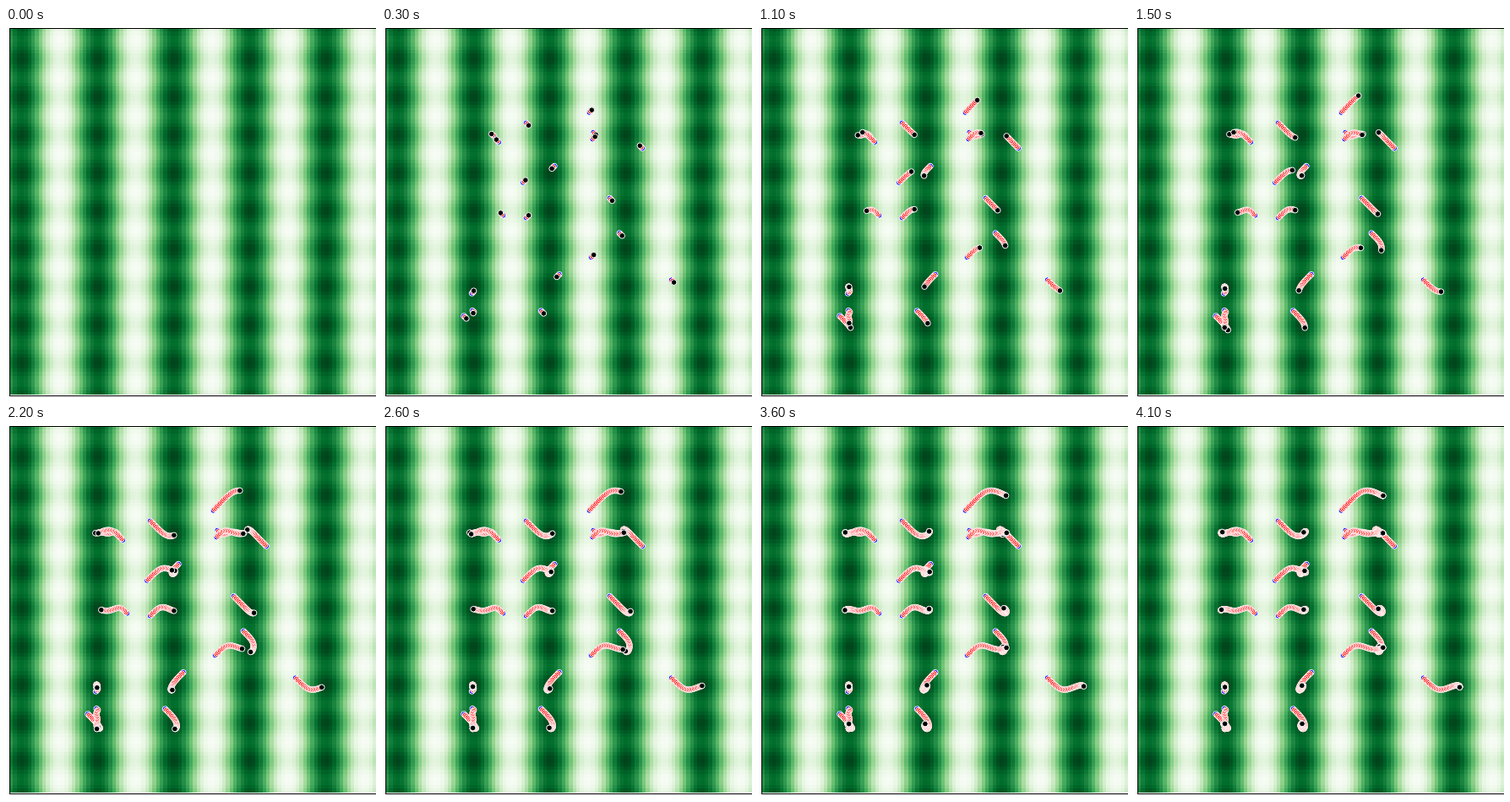
An HTML page with a canvas for the animation above (4200 ms loop, 438x438 px).

```html
<!DOCTYPE html>
<html>
<head>
<meta charset="utf-8">
<style>
html, body { margin: 0; width: 100%; height: 100%; overflow: hidden; background: #fff; }
canvas { display: block; }
</style>
</head>
<body>
<canvas id="stage" width="438" height="438"></canvas>
<script>
const STEP_MS = 100, STEPS = 42, CELLS = 100;
const CELL_W = 4.345, CELL_H = 4.335;
const SCALE = 14.5, CENTER_X = 221.5, CENTER_Y = 217.5;
const DOT_RADIUS = 3.3, RATE = 0.1, BETA1 = 0.9, BETA2 = 0.999;
const ctx = document.getElementById('stage').getContext('2d');

// Dark to light, for low to high values
const greens = '#00441b #006d2c #238b45 #41ab5d #74c476 #a1d99b #c7e9c0 #e5f5e0 #f7fcf5'
  .split(' ').map(hex => [1, 3, 5].map(i => parseInt(hex.slice(i, i + 2), 16)));

// Where each descent begins, in stage pixels; everything else follows from these
const starts = [[245.4, 100], [170.7, 112.4], [132.6, 128], [138.3, 135], [308.2, 142.2],
  [250.3, 123.5], [249.3, 131.6], [204, 163.5], [167, 183], [143.3, 221.8],
  [170.7, 224.7], [269.6, 201.5], [281.3, 243], [247.8, 271.5], [209.8, 291.7],
  [342.7, 298.2], [106.5, 314], [97, 341], [107.2, 334.7], [188.5, 335]];

function green(v) {
  const p = v * (greens.length - 1);
  const i = Math.min(greens.length - 2, Math.floor(p));
  return `rgb(${greens[i].map((c, k) => Math.round(c + (greens[i + 1][k] - c) * (p - i)))})`;
}

function makeSurface() {
  const surface = document.createElement('canvas');
  surface.width = surface.height = 438;
  const g = surface.getContext('2d');
  g.fillStyle = '#fff';
  g.fillRect(0, 0, 438, 438);
  const value = i => -15 + 30 * i / (CELLS - 1);
  for (let i = 0; i < CELLS; i++) {
    for (let j = 0; j < CELLS; j++) {
      const height = Math.sin(value(i)) + 0.3 * Math.sin(value(j)) ** 2;
      const left = Math.round(4 + i * CELL_W), right = Math.round(4 + (i + 1) * CELL_W);
      const top = Math.round(j * CELL_H), bottom = Math.round((j + 1) * CELL_H);
      g.fillStyle = green((height + 1) / 2.3);
      g.fillRect(left, top, right - left, bottom - top);
    }
  }
  g.strokeRect(4.5, 0.5, 435, 435);
  return surface;
}

// Adam along one axis; the surface is separable
function descend(x, gradient) {
  const path = [x];
  let m = 0, v = 0;
  for (let t = 1; t < STEPS; t++) {
    const g = gradient(x);
    m = BETA1 * m + (1 - BETA1) * g;
    v = BETA2 * v + (1 - BETA2) * g * g;
    x -= RATE * (m / (1 - BETA1 ** t)) / Math.sqrt(v / (1 - BETA2 ** t) + 1e-16);
    path.push(x);
  }
  return path;
}

const paths = starts.map(([px, py]) => {
  const xs = descend((px - CENTER_X) / SCALE, Math.cos);
  const ys = descend((py - CENTER_Y) / SCALE, y => 0.3 * Math.sin(2 * y));
  return xs.map((x, i) => [CENTER_X + SCALE * x, CENTER_Y + SCALE * ys[i]]);
});

function dot([x, y], color) {
  ctx.beginPath();
  ctx.arc(x, y, DOT_RADIUS, 0, 2 * Math.PI);
  ctx.fillStyle = color;
  ctx.fill();
  ctx.stroke();
}

const surface = makeSurface();
ctx.strokeStyle = '#fff';

function draw(now) {
  const count = Math.floor(now / STEP_MS) % STEPS;
  ctx.drawImage(surface, 0, 0);
  for (const path of paths) {
    path.slice(0, count).forEach((point, i) =>
      dot(point, i === count - 1 ? '#000' : i ? '#f00' : '#00f'));
  }
}

const start = performance.now();
function tick() {
  draw(performance.now() - start);
  requestAnimationFrame(tick);
}
tick();
</script>
</body>
</html>
```
